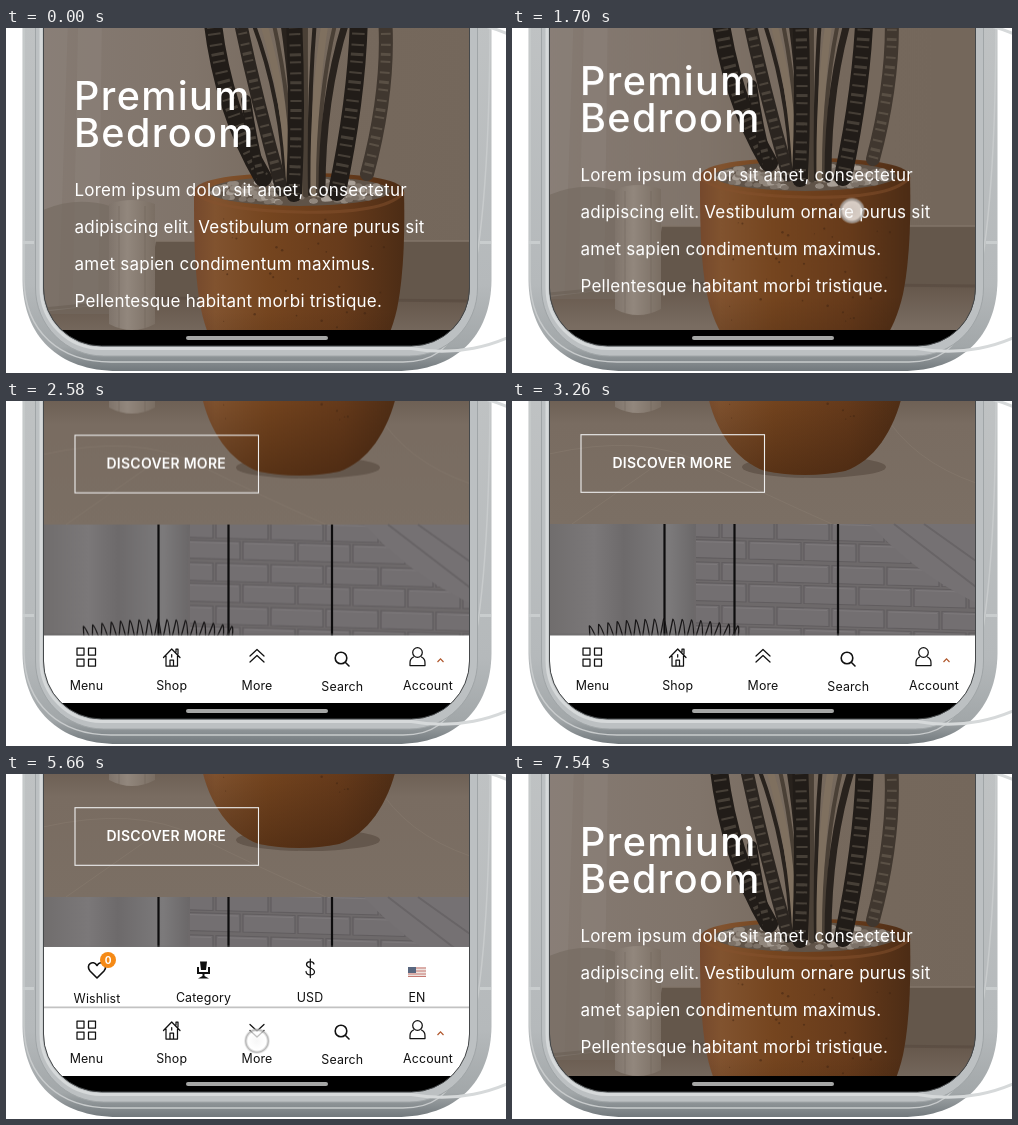
An HTML page for the animation above (7.58 s loop, 500 px wide and 345 px high).

```html
<!DOCTYPE html>
<html lang="en">
<head>
<meta charset="utf-8">
<title>Phone shop page</title>
<style>
html, body { margin: 0; width: 100%; height: 100%; overflow: hidden; background: #fff; }
svg { display: block; width: 500px; height: 345px; }
text { font-family: Inter, "Open Sans", sans-serif; }
.title { font-size: 39.5px; font-weight: 500; letter-spacing: 1.4px; fill: #fff; }
.body { font-size: 17px; letter-spacing: .22px; fill: #fff; }
.button { font-size: 14px; font-weight: 600; letter-spacing: .25px; fill: #fff; }
.label { font-size: 12.4px; letter-spacing: .15px; fill: #111; text-anchor: middle; }
.icon { fill: none; stroke: #111; stroke-width: 1.25; stroke-linejoin: round; stroke-linecap: round; }
.bold { stroke-width: 1.6; }
#page, #nav, #panel, #pointer, .up, .down { animation: 7580ms linear infinite; }
#page { animation-name: scroll; }
#nav { animation-name: nav; }
#panel { animation-name: panel; }
#pointer { animation-name: pointer; }
.up { animation-name: up; }
.down { animation-name: down; }

@keyframes scroll {
  0%, 21.1% { transform: translateY(0); animation-timing-function: cubic-bezier(.35, 0, .6, .72); }
  28.23% { transform: translateY(-219px); animation-timing-function: cubic-bezier(.3, .6, .5, 1); }
  34.8%, 93.14% { transform: translateY(-290px); }
  93.67% { transform: translateY(-284.7px); animation-timing-function: cubic-bezier(.4, .1, .5, 1); }
  98.9%, 100% { transform: translateY(0); }
}
@keyframes nav {
  0%, 22.4% { transform: translateY(72px); animation-timing-function: ease-out; }
  26.4%, 95.2% { transform: translateY(0); animation-timing-function: ease-in; }
  98.6%, 100% { transform: translateY(72px); }
}
@keyframes panel {
  0%, 53.3% { transform: translateY(66px); animation-timing-function: ease-out; }
  56.7%, 76% { transform: translateY(0); animation-timing-function: ease-in-out; }
  79.4%, 100% { transform: translateY(66px); }
}
@keyframes up {
  0%, 53.3% { opacity: 1; animation-timing-function: step-end; }
  53.31%, 76% { opacity: 0; animation-timing-function: step-end; }
  76.01%, 100% { opacity: 1; }
}
@keyframes down {
  0%, 53.3% { opacity: 0; animation-timing-function: step-end; }
  53.31%, 76% { opacity: 1; animation-timing-function: step-end; }
  76.01%, 100% { opacity: 0; }
}
@keyframes pointer {
  0%, 19.5% { transform: translate(340px, 235px); opacity: 0; }
  20.6%, 21.1% { transform: translate(340px, 235px); opacity: 1; }
  25.2% { transform: translate(340px, 75px); opacity: 1; }
  26.2% { transform: translate(340px, 65px); opacity: 0; }
  26.3%, 51% { transform: translate(251px, 267px); opacity: 0; }
  52%, 54% { transform: translate(251px, 267px); opacity: 1; }
  55%, 73% { transform: translate(251px, 267px); opacity: 0; }
  74%, 76% { transform: translate(251px, 267px); opacity: 1; }
  77% { transform: translate(251px, 267px); opacity: 0; }
  77.1%, 92% { transform: translate(340px, 63px); opacity: 0; }
  92.8%, 93.14% { transform: translate(340px, 63px); opacity: 1; }
  93.67% { transform: translate(340px, 68px); opacity: 1; }
  96.8% { transform: translate(340px, 225px); opacity: 1; }
  97.8%, 100% { transform: translate(340px, 245px); opacity: 0; }
}
</style>
</head>
<body>
<svg viewBox="0 0 500 345">
  <defs>
    <path id="glass" d="M37.500-5V260A58 58 0 0 0 95.500 318H405.500A58 58 0 0 0 463.500 260V-5"/>
    <clipPath id="screen"><use href="#glass"/></clipPath>
    <clipPath id="view"><rect x="37" y="-5" width="428" height="306.500"/></clipPath>
    <clipPath id="aboveNav"><rect x="37" y="100" width="428" height="136"/></clipPath>
    <clipPath id="hero"><rect x="37" y="-5" width="428" height="418"/></clipPath>
    <clipPath id="bricks"><path d="M184 413H464V610H184Z"/></clipPath>
    <linearGradient id="wall">
      <stop offset="0" stop-color="#857a72"/><stop offset=".35" stop-color="#80746a"/>
      <stop offset=".6" stop-color="#76695d"/><stop offset="1" stop-color="#74675b"/>
    </linearGradient>
    <linearGradient id="floor" x2="0" y2="1">
      <stop offset="0" stop-color="#65574b"/><stop offset=".3" stop-color="#796c61"/><stop offset="1" stop-color="#7b6f64"/>
    </linearGradient>
    <linearGradient id="pot">
      <stop offset="0" stop-color="#75492d"/><stop offset=".1" stop-color="#81532f"/><stop offset=".35" stop-color="#75451f"/>
      <stop offset=".7" stop-color="#673b1b"/><stop offset="1" stop-color="#4c2c15"/>
    </linearGradient>
    <linearGradient id="potShade" x2="0" y2="1">
      <stop offset=".6" stop-color="#2b1508" stop-opacity="0"/><stop offset="1" stop-color="#2b1508" stop-opacity=".4"/>
    </linearGradient>
    <linearGradient id="jar">
      <stop offset="0" stop-color="#7f746b"/><stop offset=".4" stop-color="#92877d"/><stop offset="1" stop-color="#7a6e63"/>
    </linearGradient>
    <linearGradient id="curtain">
      <stop offset="0" stop-color="#706d6d"/><stop offset=".3" stop-color="#7b7879"/><stop offset=".5" stop-color="#6d6a6b"/>
      <stop offset=".8" stop-color="#7c7a7b"/><stop offset="1" stop-color="#686566"/>
    </linearGradient>
    <linearGradient id="metal" x2="0" y2="1">
      <stop offset="0" stop-color="#bfc2c3"/><stop offset=".75" stop-color="#b5b9bb"/>
      <stop offset=".93" stop-color="#a2a7a9"/><stop offset="1" stop-color="#72797d"/>
    </linearGradient>
    <radialGradient id="touch">
      <stop offset="0" stop-color="#f4f4f4" stop-opacity=".75"/><stop offset=".7" stop-color="#fff" stop-opacity=".75"/>
      <stop offset=".86" stop-color="#aaa" stop-opacity=".75"/><stop offset="1" stop-color="#ccc" stop-opacity=".25"/>
    </radialGradient>
  </defs>

  <g id="frame">
    <path d="M16.500-5V252C17 308 52 343 112 343H390C450 343 485 308 485.500 252V-5Z" fill="url(#metal)"/>
    <path d="M18-5V252C19 304 54 334 105 334H397C448 334 483 304 484-5" fill="none" stroke="#c8cbcc" stroke-width="1.500"/>
    <path d="M29.500-5V260A68 68 0 0 0 97.500 328H403.500A68 68 0 0 0 471.500 260V-5" fill="#bcc0c2" stroke="#a0a5a7"/>
    <path d="M35-5V260A60.500 60.500 0 0 0 95.500 320.500H405.500A60.500 60.500 0 0 0 466-5" fill="none" stroke="#d6d9da" stroke-width="3"/>
    <path d="M17 214.500H28M474 214.500H485" stroke="#c9cdce" stroke-width="3"/>
  </g>

  <g clip-path="url(#screen)">
    <rect x="37" y="-5" width="428" height="330"/>
    <g clip-path="url(#view)">
      <g id="page">
        <g clip-path="url(#hero)">
          <rect x="37" y="-5" width="428" height="418" fill="url(#wall)"/>
          <path d="M37-5H62L52 300H37ZM72-5H96L92 300H66Z" fill="#90867e" opacity=".4"/>
          <path d="M150 213H464V274H140Z" fill="#64574b"/>
          <path d="M146 213H464" stroke="#827568" stroke-width="1.500"/>
          <path d="M37 284L150 270 464 273V413H37Z" fill="url(#floor)"/>
          <path d="M37 281L150 270 464 273" fill="none" stroke="#54473c" stroke-width="3" opacity=".5"/>
          <path d="M37 343Q130 322 190 352T320 413M370 300Q400 350 464 372M60 413L150 350" fill="none" stroke="#8d8074" opacity=".4"/>
          <path d="M37 182Q70 168 104 178V286H37Z" fill="#74695f" opacity=".6"/>
          <path d="M103 176Q126 168 149 176V296Q126 308 103 296Z" fill="url(#jar)"/>
          <path d="M113 178V300M139 178V300" stroke="#675c53" opacity=".4"/>
          <ellipse cx="302" cy="356" rx="72" ry="11" fill="#44362b" opacity=".4"/>
          <path id="potShape" d="M188 162C188 204 188 246 195 281C203 320 224 350 253 360Q293 368 333 360C362 350 382 320 391 281C398 246 399 204 398 162Q390 145 293 145T188 162Z" fill="url(#pot)"/>
          <path d="M188 162C188 204 188 246 195 281C203 320 224 350 253 360Q293 368 333 360C362 350 382 320 391 281C398 246 399 204 398 162Z" fill="url(#potShade)"/>
          <path d="M188 164Q205 182 293 184T398 164" fill="none" stroke="#85522f" stroke-width="3" opacity=".5"/>
          <ellipse cx="293" cy="163" rx="91" ry="15" fill="#5f5348"/>
          <g id="pebbles"></g>
          <g id="specks" fill="#3f2412" opacity=".5"></g>
          <g id="plant" fill="none" stroke-linecap="round"></g>
        </g>

        <g id="room">
          <rect x="37" y="413" width="428" height="200" fill="#6d696a"/>
          <g id="wallBricks" clip-path="url(#bricks)" fill="none"></g>
          <path d="M37 413H184Q178 500 187 613H37Z" fill="url(#curtain)"/>
          <path d="M358 413Q400 460 464 492V413Z" fill="#757173"/>
          <path d="M382 413L464 476M412 413L464 450" stroke="#686466" stroke-width="2"/>
          <path d="M152.500 413V530M222.500 413V613M326 413V613" stroke="#0d0c0d" stroke-width="2.200"/>
          <path id="basket" fill="none" stroke="#181617" stroke-width="1.300" stroke-linejoin="round"/>
        </g>

        <text class="title" x="68" y="81.500">Premium</text>
        <text class="title" x="68" y="119">Bedroom</text>
        <g id="copy"></g>
        <rect x="69" y="323.700" width="183.500" height="57.600" fill="none" stroke="#eee" stroke-width="1.100"/>
        <text class="button" x="100.500" y="357.300">DISCOVER MORE</text>
      </g>

      <g id="nav">
        <g clip-path="url(#aboveNav)">
          <g id="panel">
            <path d="M37 172.500H465" stroke="#777" stroke-opacity=".35" stroke-width="2"/>
            <rect x="37" y="173" width="428" height="63" fill="#fff"/>
            <path class="icon bold" d="M91 204L84 197C79 191 87 185 91 191.500C95 185 103 191 98 197Z"/>
            <circle cx="102" cy="186" r="8" fill="#f58a16"/>
            <text x="102" y="189.700" font-size="10" font-weight="700" fill="#fff" text-anchor="middle">0</text>
            <path d="M194 187.500H201L200 196H195ZM191 193H193V198H202V193H204V200H198.500V202L203 204.500H192L196.500 202V200H191Z" fill="#111"/>
            <path class="icon" d="M308 190C307 186.500 300.500 187 300.500 190.500C300.500 195 308.500 193 308.500 198C308.500 202 300.500 202 300 197.500M304.300 185V203.500"/>
            <rect x="402" y="193" width="18" height="10" fill="#eee3df"/>
            <path d="M402 194H420M402 197H420M402 200H420M402 202.500H420" stroke="#c67972"/>
            <rect x="402" y="193" width="8" height="6" fill="#59677f"/>
            <text class="label" x="91" y="228.500">Wishlist</text>
            <text class="label" x="197.500" y="227.500">Category</text>
            <text class="label" x="304" y="227.500">USD</text>
            <text class="label" x="411" y="227.500">EN</text>
          </g>
        </g>
        <path d="M37 233.500H465" stroke="#666" stroke-opacity=".4" stroke-width="2"/>
        <rect x="37" y="234.500" width="428" height="68" fill="#fff"/>
        <path class="icon" d="M71 247H78V254H71ZM82.500 247H89.500V254H82.500ZM71 258H78V265H71ZM82.500 258H89.500V265H82.500Z"/>
        <path class="icon" d="M157.500 256.500L165.700 248 174 256.500M160 255V265H171.500V255M164 265V259H167.500V265M165.700 253.500V256M170 251V248H172V253"/>
        <path class="icon up" d="M244 255L251 248.500 258 255M244 261L251 254.500 258 261"/>
        <path class="icon down" d="M244 250.500L251 257 258 250.500M244 256.500L251 263 258 256.500"/>
        <path class="icon bold" d="M329.200 257A5.800 5.800 0 1 1 340.800 257A5.800 5.800 0 1 1 329.200 257M339.500 261.500L343 265"/>
        <g class="icon"><circle cx="411.500" cy="251.500" r="4.800"/><path d="M407.500 256C403.500 258 404 261 404 264.500H419C419 261 419.500 258 415.500 256"/></g>
        <path d="M431.500 261L434.500 257.800 437.500 261" fill="none" stroke="#b0572c" stroke-width="1.200"/>
        <text class="label" x="80.500" y="288.500">Menu</text>
        <text class="label" x="165.700" y="288.500">Shop</text>
        <text class="label" x="251" y="288.500">More</text>
        <text class="label" x="336.300" y="290">Search</text>
        <text class="label" x="422" y="288.500">Account</text>
      </g>
    </g>
    <rect x="180" y="308" width="142" height="4" rx="2" fill="#a5a6a5"/>
    <g id="pointer">
      <circle r="13" fill="url(#touch)"/>
      <circle r="11.500" fill="none" stroke="#aaa" stroke-opacity=".45"/>
    </g>
  </g>
  <use href="#glass" fill="none" stroke="#45484a"/>
</svg>
<script>
const byId = id => document.getElementById(id);
let seed = 11;
const rand = () => (seed = seed * 16807 % 2147483647) / 2147483647;
const put = (id, html) => { byId(id).innerHTML += html; };

[
  "Lorem ipsum dolor sit amet, consectetur",
  "adipiscing elit. Vestibulum ornare purus sit",
  "amet sapien condimentum maximus.",
  "Pellentesque habitant morbi tristique."
].forEach((line, i) => put("copy", `<text class="body" x="68.500" y="${168 + i * 37.1}">${line}</text>`));

for (let i = 0; i < 150; i++) {
  const a = rand() * 6.283, r = Math.sqrt(rand());
  const tone = ["#91877d", "#7c7167", "#a89f96"][i % 3];
  put("pebbles", `<ellipse cx="${293 + 86 * r * Math.cos(a)}" cy="${163 + 12 * r * Math.sin(a)}" rx="4" ry="2.500" fill="${tone}"/>`);
}
for (let i = 0; i < 45; i++) {
  put("specks", `<circle cx="${205 + rand() * 175}" cy="${190 + rand() * 120}" r="${.5 + rand() * .8}"/>`);
}

// A dark blade with mottled bands across it.
function blade(top, bend, foot, width, tone = "#211c18") {
  const d = `M${top}Q${bend} ${foot}`;
  put("plant", `<path d="${d}" stroke="${tone}" stroke-width="${width}"/>
    <path d="${d}" stroke="#85796b" stroke-opacity=".38" stroke-width="${width * .7}" stroke-linecap="butt" stroke-dasharray="2 7 3 5 2 9"/>`);
}
// Narrow leaves seen edge-on, fanning out of the pot.
for (let i = 0; i < 10; i++) {
  const x = 246 + i * 10.5;
  const tone = ["#28221d", "#7f705f", "#4a4036"][i % 3];
  put("plant", `<path d="M${x} -8Q${276 + i * 4.4} 70 ${280 + i * 4} 166" stroke="${tone}" stroke-width="${4 + i % 2 * 3}"/>`);
}
blade("206 -12", "216 80", "257 150", 18);
blade("233 -12", "250 70", "276 162", 13, "#2b2520");
blade("240 72", "246 115", "256 152", 10);
blade("288 -12", "292 80", "288 166", 16);
blade("353 -12", "351 70", "331 164", 18);
blade("379 -12", "384 60", "361 146", 14, "#40372f");

for (let row = 0; row < 10; row++) {
  for (let col = 0; col < 7; col++) {
    const x = 155 + col * 55 + row % 2 * 27, y = 407 + row * 21.5 + col * 1.5;
    put("wallBricks", `<path d="M${x} ${y}l52 1.500v18l-52-1.500z" fill="#736f71" stroke="#615d5f" stroke-width="1.200"/>
      <path d="M${x + 2} ${y + 2}l48 1.500" stroke="#7d797b"/>`);
  }
}

let d = "M78 528";
for (let i = 0; i < 17; i++) {
  const x = 82 + i * 8.7, u = (x - 152) / 75;
  const lean = u * 5, top = 508 + 8 * u * u;
  d += `L${x + lean} ${top}Q${x + lean + 2} ${top} ${x + 4.3} ${532}`;
}
byId("basket").setAttribute("d", d);
</script>
</body>
</html>
```
